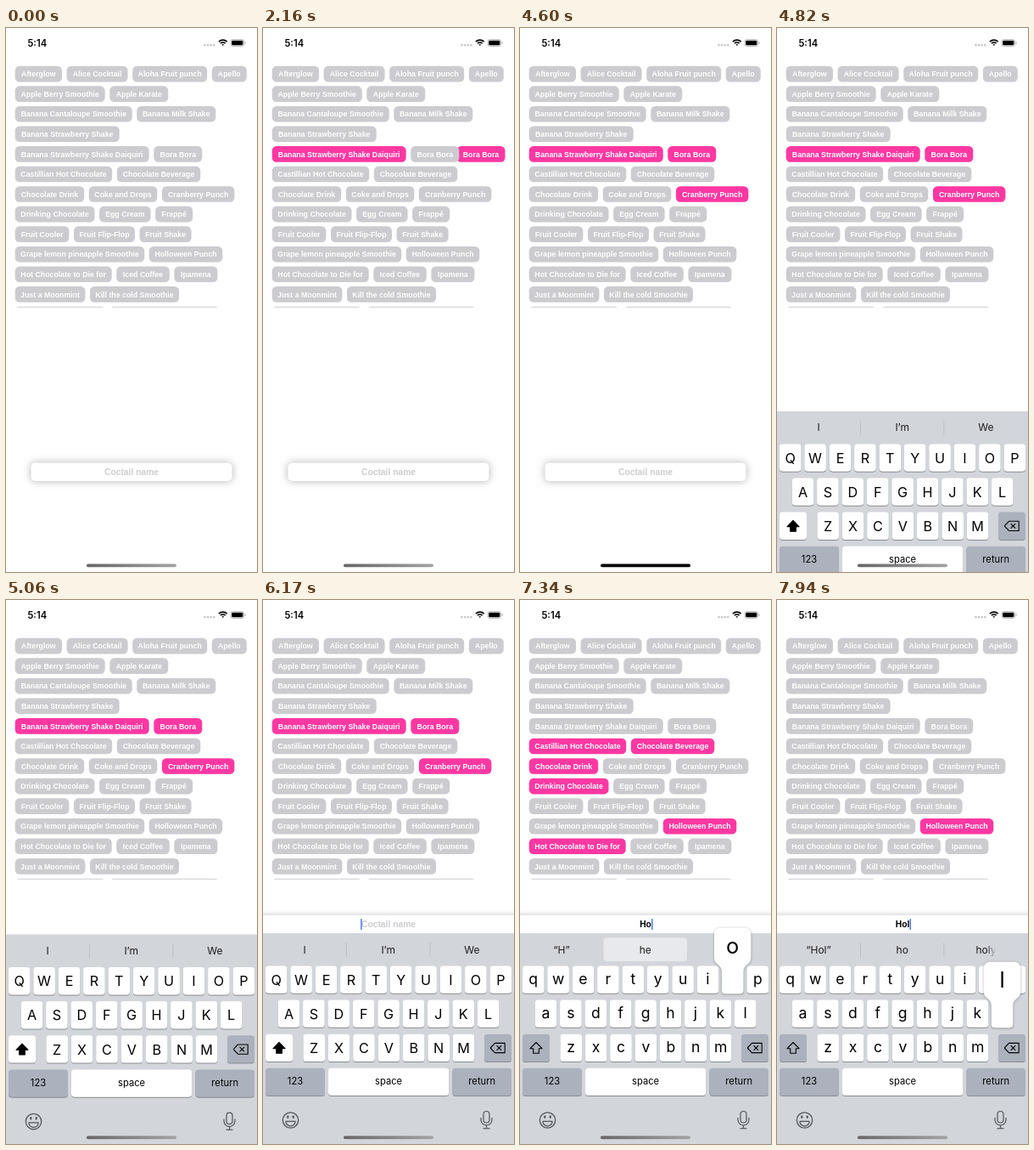
An HTML page with a canvas for the animation above (8000 ms loop, 296 px wide and 640 px high).

```html
<!DOCTYPE html>
<html lang="en">
<head>
<meta charset="utf-8">
<style>
  html, body { margin: 0; width: 100%; height: 100%; overflow: hidden; background: #fff; }
  canvas { display: block; width: 296px; height: 640px; }
</style>
</head>
<body>
<canvas id="stage"></canvas>
<script>
const LOOP = 8000, GREY = '#cbcbd0', PINK = '#fe38a2', DARK_KEY = '#abb2bd', INK = '#1c1c1e';
const BOLD = 'bold', UI = 'Inter, "Liberation Sans", sans-serif';
const LABEL = '"Liberation Sans", Arial, sans-serif';

// Each row: name, chip width, name, chip width...
const chipRows = [
  ['Afterglow', 55.3, 'Alice Cocktail', 72, 'Aloha Fruit punch', 88, 'Apello', 41],
  ['Apple Berry Smoothie', 106, 'Apple Karate', 69],
  ['Banana Cantaloupe Smoothie', 138, 'Banana Milk Shake', 93],
  ['Banana Strawberry Shake', 123],
  ['Banana Strawberry Shake Daiquiri', 158, 'Bora Bora', 57],
  ['Castillian Hot Chocolate', 114.5, 'Chocolate Beverage', 98.5],
  ['Chocolate Drink', 81.5, 'Coke and Drops', 80.5, 'Cranberry Punch', 85.5],
  ['Drinking Chocolate', 93.8, 'Egg Cream', 60.5, 'Frappé', 44],
  ['Fruit Cooler', 63.7, 'Fruit Flip-Flop', 72, 'Fruit Shake', 61],
  ['Grape lemon pineapple Smoothie', 152.5, 'Holloween Punch', 86.5],
  ['Hot Chocolate to Die for', 114, 'Iced Coffee', 62.5, 'Ipamena', 51],
  ['Just a Moonmint', 82.7, 'Kill the cold Smoothie', 105],
  ['', 106, '', 129]
];

// Start, fade length, which names are lit.
const filters = [
  [0, 1, /(?!)/],
  [1280, 310, /Daiquiri/],
  [2160, 310, /Daiquiri|Bora/],
  [3240, 310, /Daiquiri|Bora|Cranberry/],
  [6680, 220, /h/i],
  [7200, 140, /ho/i],
  [7730, 200, /hol/i]
];
const suggestions = [
  [0, ['I', 'I’m', 'We']],
  [6680, ['“H”', '', '']],
  [7050, ['“H”', 'he', 'her']],
  [7470, ['“Ho”', 'hot', 'how']],
  [7730, ['“Hol”', 'ho', 'holy']]
];
const typed = [[0, ''], [6530, 'H'], [7210, 'Ho'], [7730, 'Hol']];
// Start, end, letter, key centre, key top.
const presses = [
  [6530, 6680, 'H', 177.5, 470.5],
  [7210, 7470, 'o', 250.7, 430.5],
  [7730, 8000, 'l', 265.5, 470.5]
];
const keyRows = [['QWERTYUIOP', 15.7, 430.5], ['ASDFGHJKL', 30.5, 470.5], ['ZXCVBNM', 60.2, 510.7]];

const canvas = document.getElementById('stage'), ctx = canvas.getContext('2d');
const dpr = window.devicePixelRatio || 1;
canvas.width = 296 * dpr;
canvas.height = 640 * dpr;

const clamp = v => Math.max(0, Math.min(1, v));
const ease = v => { v = clamp(v); return v * v * (3 - 2 * v); };
const latest = (list, t) => list.filter(item => item[0] <= t).pop();

function box(x, y, w, h, r, color) {
  ctx.beginPath();
  ctx.roundRect(x, y, w, h, r);
  ctx.fillStyle = color;
  ctx.fill();
}
function text(str, x, y, size, color, family = UI, weight = 400) {
  ctx.font = `${weight} ${size}px ${family}`;
  ctx.textAlign = 'center';
  ctx.fillStyle = color;
  ctx.fillText(str, x, y);
}
function shadow(color, blur, dy) {
  ctx.shadowColor = color;
  ctx.shadowBlur = blur * dpr;
  ctx.shadowOffsetY = dy * dpr;
}
const noShadow = () => shadow('transparent', 0, 0);
function line(color, width, ...points) {
  ctx.beginPath();
  points.forEach(([x, y]) => ctx.lineTo(x, y));
  ctx.strokeStyle = color;
  ctx.lineWidth = width;
  ctx.stroke();
}

function statusBar() {
  text('5:14', 36.8, 22, 11.2, '#000', UI, 600);
  for (let i = 0; i < 4; i++) box(233.2 + i * 3.6, 18.8, 2.6, 2.6, 1.3, '#c6c6c8');
  ctx.strokeStyle = '#000';
  ctx.lineWidth = 1.7;
  for (const r of [1.1, 4, 6.9]) {
    ctx.beginPath();
    ctx.arc(255.8, 21, r, -Math.PI * .75, -Math.PI * .25);
    ctx.stroke();
  }
  ctx.beginPath();
  ctx.roundRect(265, 13.6, 15.6, 7.8, 2.3);
  ctx.strokeStyle = '#a8a8a8';
  ctx.lineWidth = .8;
  ctx.stroke();
  box(266.2, 14.8, 13.2, 5.4, 1.3, '#000');
  box(281.6, 16.2, 1, 2.6, .5, '#a8a8a8');
}

function chip(name, x, y, w, color, alpha = 1) {
  ctx.globalAlpha = alpha;
  box(x, y, w, 18.6, 5.2, color);
  text(name, x + w / 2, y + 12.5, 8.8, '#fff', LABEL, BOLD);
  ctx.globalAlpha = 1;
}
function chips(t) {
  const now = latest(filters, t), before = filters[filters.indexOf(now) - 1] || now;
  const p = ease((t - now[0]) / now[1]);
  ctx.save();
  ctx.beginPath();
  ctx.rect(0, 0, 296, 328.8);
  ctx.clip();
  chipRows.forEach((row, r) => {
    const y = 44.8 + r * 23.57;
    let x = 10.7;
    for (let i = 0; i < row.length; i += 2) {
      const name = row[i], w = row[i + 1];
      const lit = now[2].test(name), wasLit = before[2].test(name);
      // A newly lit chip slides in from the right margin under its fading grey twin.
      const slide = lit && !wasLit && i ? (285.5 - w - x) * (1 - p) : 0;
      chip(name, x + slide, y, w, lit ? PINK : GREY);
      if (lit !== wasLit && p < 1) chip(name, x, y, w, wasLit ? PINK : GREY, 1 - p);
      x += w + 5.6;
    }
  });
  ctx.restore();
}

function field(t) {
  const docked = t >= 5660;
  const y = docked ? 392 - 21.3 * ease((t - 5660) / 150) : 511.5;
  shadow('rgba(0,0,0,.3)', docked ? 7 : 10, 0);
  if (docked) box(-4, y, 304, 21.5, 0, '#fff');
  else box(29.5, y, 237, 21.5, 5, '#fff');
  noShadow();

  const value = latest(typed, t)[1];
  text(value || 'Coctail name', 148, y + 14.3, 10.3, value ? '#000' : '#cdcdd1', LABEL, BOLD);
  if (!docked) return;
  const caretX = value ? 148.3 + ctx.measureText(value).width / 2 : 115.2;
  ctx.globalAlpha = t < 6050 ? 0 : t < 6170 ? .5 : 1;
  box(caretX, y + 4.3, 1.4, 13, .6, '#426bf2');
  ctx.globalAlpha = 1;
}

function key(x, y, w, color) {
  box(x, y + 1, w, 32.3, 3.6, '#898c91');
  box(x, y, w, 32.3, 3.6, color);
}
function shiftArrow(filled) {
  ctx.beginPath();
  [[0, -6.8], [7, .4], [3.3, .4], [3.3, 6], [-3.3, 6], [-3.3, .4], [-7, .4]]
    .forEach(([x, y]) => ctx.lineTo(19 + x, 527.3 + y));
  ctx.closePath();
  ctx.lineJoin = 'round';
  ctx.lineWidth = 1.1;
  ctx.strokeStyle = ctx.fillStyle = '#000';
  ctx.stroke();
  if (filled) ctx.fill();
}
function deleteIcon() {
  line('#000', 1.1, [268.2, 527], [273.5, 521.4], [285.2, 521.4], [285.2, 532.6], [273.5, 532.6], [268.2, 527]);
  line('#000', 1.1, [275.6, 524.2], [281.2, 529.8]);
  line('#000', 1.1, [281.2, 524.2], [275.6, 529.8]);
}
function smiley() {
  const color = '#53575d';
  ctx.strokeStyle = color;
  ctx.lineWidth = 1.3;
  ctx.beginPath();
  ctx.arc(32.5, 612, 9.2, 0, 7);
  ctx.stroke();
  ctx.beginPath();
  ctx.arc(32.5, 613.3, 5.6, 0, Math.PI);
  ctx.closePath();
  ctx.stroke();
  for (const x of [28.2, 34.6]) box(x, 606.5, 2.2, 3.4, 1.1, color);
}
function microphone() {
  ctx.strokeStyle = '#53575d';
  ctx.lineWidth = 1.2;
  ctx.beginPath();
  ctx.roundRect(260, 601.5, 7, 13.5, 3.5);
  ctx.stroke();
  ctx.beginPath();
  ctx.moveTo(257, 609);
  ctx.lineTo(257, 611.5);
  ctx.arc(263.5, 611.5, 6.5, Math.PI, 0, true);
  ctx.lineTo(270, 609);
  ctx.stroke();
  line('#53575d', 1.2, [263.5, 618], [263.5, 621.5]);
  line('#53575d', 1.2, [259.5, 621.7], [267.5, 621.7]);
}
function suggestionBar(t) {
  if (t >= 7210 && t < 7470) box(98.5, 397.3, 98.5, 27.8, 4, '#e7e9ec');
  else for (const x of [98, 196.5]) box(x, 403, .8, 17, 0, '#b7bbc1');
  latest(suggestions, t)[1].forEach((word, i) => {
    let color = INK;
    if (word === 'holy') {
      color = ctx.createLinearGradient(248, 0, 258, 0);
      color.addColorStop(0, INK);
      color.addColorStop(1, 'rgba(28,28,30,0)');
    }
    text(word, 49 + i * 98.7, 415.6, 12, color);
  });
}
function popup([, , letter, x, y]) {
  const wide = 21.7, narrow = 12.7, top = y - 44.7;
  ctx.beginPath();
  ctx.moveTo(x, top);
  ctx.arcTo(x + wide, top, x + wide, y, 7);
  ctx.lineTo(x + wide, y - 10);
  ctx.bezierCurveTo(x + wide, y - 1, x + narrow, y - 2, x + narrow, y + 7);
  ctx.arcTo(x + narrow, y + 33, x, y + 33, 4);
  ctx.arcTo(x - narrow, y + 33, x - narrow, y + 7, 4);
  ctx.lineTo(x - narrow, y + 7);
  ctx.bezierCurveTo(x - narrow, y - 2, x - wide, y - 1, x - wide, y - 10);
  ctx.arcTo(x - wide, top, x, top, 7);
  ctx.closePath();
  shadow('rgba(0,0,0,.32)', 3, .5);
  ctx.fillStyle = '#fff';
  ctx.fill();
  noShadow();
  text(letter, x, y + (letter === 'o' ? -14.8 : -14.2), 25.5, '#000');
}
function keyboard(t) {
  const s = Math.max(0, t - 4670) / 1000 * 18.3;
  const offset = t > 5400 ? 0 : 248 * (1 + s) * Math.exp(-s);
  const upper = t < 6680;
  ctx.save();
  ctx.translate(0, offset);
  box(0, 392, 296, 250, 0, '#d2d5da');
  suggestionBar(t);
  for (const [letters, x0, y] of keyRows) {
    [...letters].forEach((letter, i) => {
      const x = x0 + i * 29.4;
      key(x - 12.8, y, 25.6, '#fff');
      if (upper) text(letter, x, y + 22.4, 16.2, '#000');
      else text(letter.toLowerCase(), x, y + 21.3, 17.6, '#000');
    });
  }
  key(3, 510.7, 32, upper ? '#fff' : DARK_KEY);
  shiftArrow(upper);
  key(261, 510.7, 32, DARK_KEY);
  deleteIcon();
  [['123', 3, 70, DARK_KEY], ['space', 77, 142.2, '#fff'], ['return', 223.5, 69.5, DARK_KEY]]
    .forEach(([label, x, w, color]) => {
      key(x, 550.8, w, color);
      text(label, x + w / 2, 570.3, 11.2, '#000');
    });
  smiley();
  microphone();
  presses.filter(([from, to]) => t >= from && t < to).forEach(popup);
  ctx.restore();
}

function homeBar(t) {
  let color = '#000';
  if (t < 4600 || t >= 4800) {
    color = ctx.createLinearGradient(95, 0, 201, 0);
    color.addColorStop(0, '#666');
    color.addColorStop(1, '#a2a2a2');
  }
  box(95, 630.6, 106, 3.6, 1.8, color);
}

function draw(t) {
  ctx.setTransform(dpr, 0, 0, dpr, 0, 0);
  box(0, 0, 296, 640, 0, '#fff');
  statusBar();
  chips(t);
  field(t);
  if (t >= 4670) keyboard(t);
  homeBar(t);
}

const start = performance.now();
function tick() {
  draw((performance.now() - start) % LOOP);
  requestAnimationFrame(tick);
}
tick();
</script>
</body>
</html>
```
